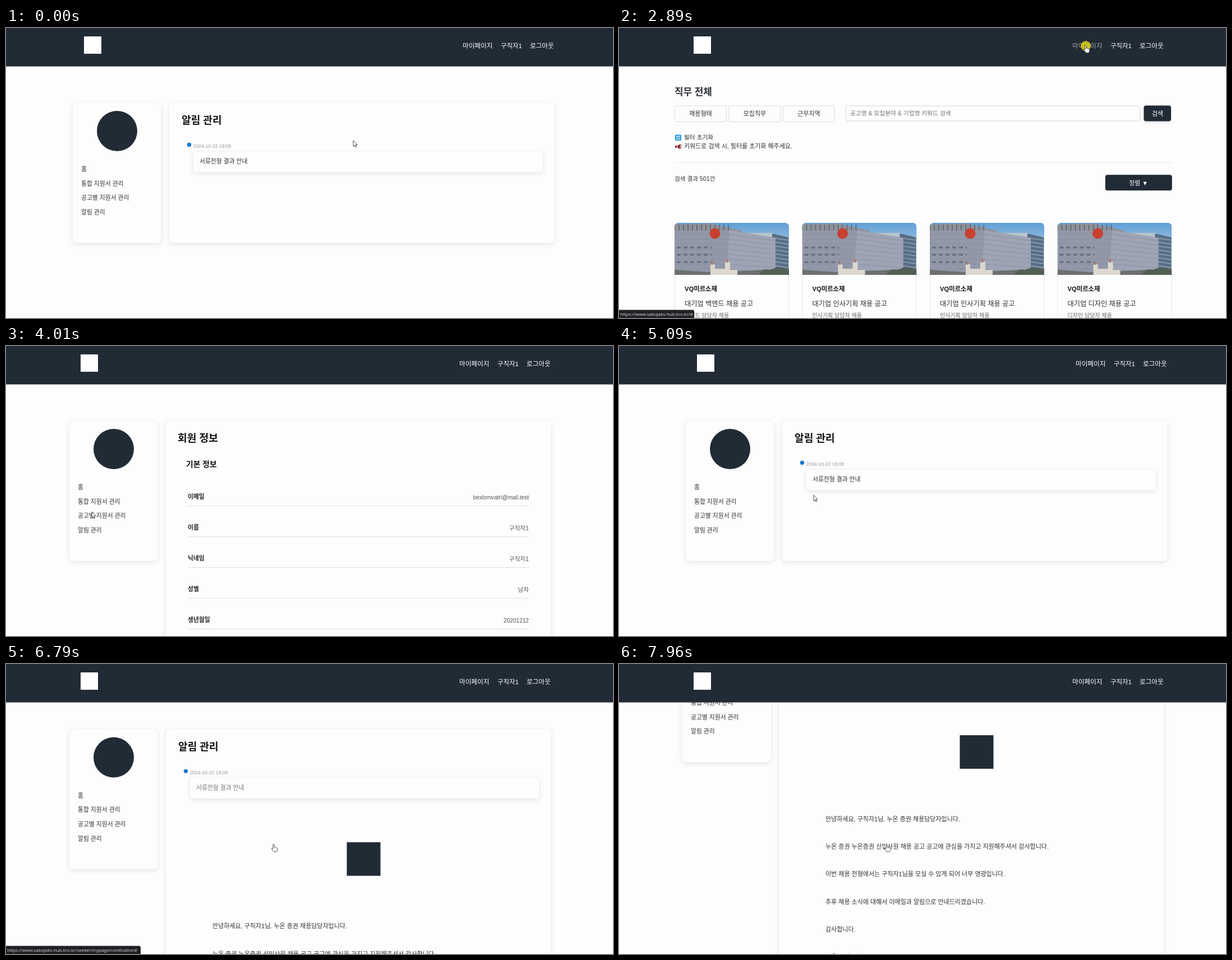
An HTML page for the animation above (8000 ms loop, 1082 by 518 pixels).

```html
<!DOCTYPE html>
<html lang="ko">
<head>
<meta charset="utf-8">
<title>알림 관리</title>
<style>
  html, body { margin: 0; width: 100%; height: 100%; overflow: hidden; background: #fdfdfd; }
  svg { display: block; width: 100%; height: 100%; }
  text { font-family: 'Liberation Sans', 'Noto Sans CJK KR', 'Noto Sans CJK', sans-serif; white-space: pre; }
  .bold { font-weight: 700; }
  .mid { text-anchor: middle; }
  .end { text-anchor: end; }
  .url { font-family: 'Open Sans', 'Noto Sans', sans-serif; }
  .panel { fill: #fdfdfd; filter: drop-shadow(0 2px 4px rgba(0, 0, 0, .11)); }
</style>
</head>
<body>
<svg id="stage" viewBox="0 0 1082 518"></svg>
<script>
const DARK = '#212b36', PAPER = '#fdfdfd', INK = '#2b2e33', LOOP = 8000;
const USER = '구직자1', FIRM = '누온 증권';
const SITE = 'https://www.sabujaks-hub.kro.kr';

const text = (x, y, size, str, fill = INK, cls = '', id = '') =>
  `<text x="${x}" y="${y + size * .37}" font-size="${size}" fill="${fill}" class="${cls}" id="${id}">${str}</text>`;
const box = (x, y, w, h, fill, r = 0, more = '') =>
  `<rect x="${x}" y="${y}" width="${w}" height="${h}" rx="${r}" fill="${fill}" ${more}/>`;
const line = (x1, x2, y, color) => `<path d="M${x1} ${y}H${x2}" stroke="${color}"/>`;
const panel = (x, y, w, h, r = 8, id = '') => box(x, y, w, h, PAPER, r, `class="panel" id="${id}"`);
const group = (id, ...parts) => `<g id="${id}">${parts.join('')}</g>`;
const repeat = (n, make) => Array.from({ length: n }, (_, i) => make(i)).join('');

const header = group('header',
  box(-20, 0, 1122, 68.6, DARK),
  box(133, 15, 31, 31, '#fff'),
  text(808, 32, 11.6, '마이페이지', '#fff', '', 'myPage'),
  text(876, 32, 11.4, USER, '#fff'),
  text(928, 32, 11.6, '로그아웃', '#fff'));

// Office building under a blue sky, 204 x 93, with the card's rounded top
const photo = `<linearGradient id="sky" x2="0" y2="1"><stop stop-color="#5f9fd6"/><stop offset=".6" stop-color="#b4cfe8"/></linearGradient>
<clipPath id="photoClip">${box(0, 0, 204, 110, '#000', 7)}</clipPath>
<clipPath id="photoFrame">${box(0, 0, 204, 93, '#000')}</clipPath>
<g id="photo" clip-path="url(#photoClip)"><g clip-path="url(#photoFrame)">
  ${box(0, 0, 204, 93, 'url(#sky)')}
  <path d="M0 3L62 1L120 14V24H0Z" fill="#8e9198"/>
  ${repeat(13, i => `<path d="M${i * 8} 3v12" stroke="#59616d" stroke-width="1.5"/>`)}
  <path d="M116 18h60v14h-60z" fill="#b9c3d0"/>
  <path d="M174 19l29 7v67h-29z" fill="#596e85"/>
  ${repeat(9, i => `<path d="M176 ${27 + i * 7}l27 4" stroke="#91a5b9" stroke-width="1.3"/>`)}
  <path d="M0 14L98 13L180 27V93H0Z" fill="#9298a8"/>
  <path d="M98 13L180 27V93H92Z" fill="#9ea4b4"/>
  ${repeat(8, i => `<path d="M0 ${20 + i * 9}H95L180 ${32 + i * 8}" stroke="#858b9c" stroke-width=".7" fill="none"/>`)}
  ${repeat(3, i => `<path d="M4 ${44 + i * 13}h62" stroke="#656c7b" stroke-width="3" stroke-dasharray="7 5"/>`)}
  <path d="M0 84l60 4l80-3l64-4v12H0z" fill="#6c706e"/>
  <path d="M64 93V74h8v8h18V70h9v14h13v9z" fill="#dcd8d0"/>
  <path d="M67 75v-6M94 71v-6" stroke="#b37a5c" stroke-width="3"/>
  <path d="M150 93q8-14 20-8q14-10 34 0v8z" fill="#525f54"/>
  <circle cx="72" cy="19" r="9.5" fill="#c8402f"/>
</g></g>`;

const jobCard = (job, i) => {
  const x = 99 + i * 227.5;
  return box(x + .5, 348.5, 203, 220, PAPER, 7, 'stroke="#e4e6e8"') +
    `<use href="#photo" x="${x}" y="348"/>` +
    text(x + 18, 466, 11.3, 'VQ미르소재', '#111', 'bold') +
    text(x + 18, 492, 12.2, `대기업 ${job} 채용 공고`) +
    text(x + 18, 513, 10, `${job} 담당자 채용`, '#666');
};

const pageButton = (x, tip) => box(x, 419, 31, 28, '#efefef', 4) +
  `<path d="M${x + 15.5 + tip} 434l${-2 * tip} -3.8v7.6z" fill="#a4abac"/>`;

const home = group('home',
  text(99, 114, 16.9, '직무 전체', INK, 'bold'),
  ['채용형태', '모집직무', '근무지역'].map((name, i) =>
    box(99.5 + i * 96.3, 139, 92, 28.5, PAPER, 3, 'stroke="#d8dbde"') +
    text(145.5 + i * 96.5, 153, 11, name, INK, 'mid')).join(''),
  box(404.5, 139, 524, 27, PAPER, 3, 'stroke="#d3d6da"'),
  text(412, 152, 10.7, '공고명 &amp; 모집분야 &amp; 기업명 키워드 검색', '#6f7378'),
  box(935.5, 138.5, 48.5, 28, DARK, 4, 'style="filter:drop-shadow(0 2px 2px #0002)"'),
  text(960, 152.5, 11, '검색', '#fff', 'mid'),
  box(100, 190.5, 11, 10.5, '#2a9fd9', 1.5),
  '<path d="M103 196v-2.5h4.5m0 -1.2v2.4M108 195.5v2.5h-4.5m0 -1.2v2.4" stroke="#fff" stroke-width="1.2" fill="none"/>',
  text(116, 195, 10.7, '필터 초기화'),
  '<path d="M100 210h3v4h-3zM104 210l5-2.5v8.5l-5-2zM110 207h1v9h-1z" fill="#8c2a30"/>',
  text(116, 211, 10.97, '키워드로 검색 시, 필터를 초기화 해주세요.'),
  line(99, 986, 240.5, '#e6e7e8'),
  box(866.8, 262.3, 119, 28, DARK, 4),
  text(926, 276.5, 11, '정렬 ▼', '#fff', 'mid'),
  group('empty',
    text(99, 269.5, 10.7, '검색 결과 건'),
    pageButton(507, -3.5), pageButton(546, 3.5),
    line(0, 1082, 476, '#e6e6e6'),
    box(526, 510, 32, 32, DARK)),
  group('results',
    text(99, 269.5, 10.6, '검색 결과 501건'),
    ['백엔드', '인사기획', '인사기획', '디자인'].map(jobCard).join('')));

const sidebar = panel(113, 134, 157.5, 250) +
  `<circle cx="192" cy="184" r="36" fill="${DARK}"/>` +
  ['홈', '통합 지원서 관리', '공고별 지원서 관리', '알림 관리']
    .map((name, i) => text(128, 252 + i * 25.6, 10.8, name)).join('');

const profileRows = [
  ['이메일', 'bexlomvatri@mail.test'], ['이름', USER], ['닉네임', USER], ['성별', '남자'], ['생년월일', '20201212']
];
const profile = group('profile',
  text(306, 164, 18.2, '회원 정보', '#111', 'bold'),
  text(321, 211, 13.8, '기본 정보', '#111', 'bold'),
  profileRows.map(([label, value], i) =>
    text(324, 269 + i * 55, 10.8, label, '#222', 'bold') +
    text(932, 270 + i * 55, /[가-힣]/.test(value) ? 10.6 : 10.1, value, '#555', 'end') +
    line(324, 932, 285.5 + i * 55, '#dedfe0')).join(''));

const mailLines = [
  `안녕하세요, ${USER}님. ${FIRM} 채용담당자입니다.`,
  `${FIRM} ${FIRM.replace(' ', '')} 신입사원 채용 공고 공고에 관심을 가지고 지원해주셔서 감사합니다.`,
  `이번 채용 전형에서는 ${USER}님을 모실 수 있게 되어 너무 영광입니다.`,
  '추후 채용 소식에 대해서 이메일과 알림으로 안내드리겠습니다.',
  '감사합니다.',
  `${FIRM} 드림`
];
const notice = group('notice',
  text(307, 164.5, 18.1, '알림 관리', '#111', 'bold'),
  '<circle cx="320.5" cy="208.5" r="3.7" fill="#1877cf"/>',
  text(327.5, 210.5, 8.6, '2024-10-22 18:08', '#999'),
  panel(328, 221, 622.5, 36.5, 4),
  text(339, 238.5, 10.8, '서류전형 결과 안내', INK, '', 'noticeTitle'),
  group('mail',
    box(607.5, 335.5, 60, 60, DARK, 0, 'id="mailMark"'),
    group('mailText', mailLines.map((s, i) => text(368, 485.5 + i * 49.1, 11, s)).join(''))));

const hand = 'M3 8V1.2a1.1 1.1 0 0 1 2.2 0V5.2c.8-.6 1.9-.2 2 .6.8-.5 1.8 0 1.9.8.9-.3 1.7.2 1.7 1.2V9.5c0 2.5-1 4-3.3 4H6C4.5 13.5 3.6 12.6 2.8 11.2L.7 8.3C0 7.2 1.2 6.3 2 7.1Z';
const pointer = group('pointer',
  '<circle id="click" cy="1" r="9" fill="#fff000" opacity=".68"/>',
  `<path id="hand" d="${hand}" transform="translate(-4)" fill="#fff" stroke="#222" stroke-width=".8"/>`,
  '<path id="arrow" d="M0 0v10.5l2.4-2.2 1.7 3.8 1.5-.7-1.7-3.7h3.4z" fill="#fff" stroke="#222" stroke-width=".8"/>');

document.getElementById('stage').innerHTML =
  `<defs>${photo}</defs>` +
  home +
  group('account', sidebar, panel(285, 134, 686.5, 250, 8, 'mainPanel'), profile, notice) +
  header +
  group('status', box(-4, 503.5, 130, 20, '#202124', 3, 'id="statusBox"'), text(2, 511.5, 8, '', '#dcdcdc', 'url', 'statusText')) +
  pointer;

const $ = id => document.getElementById(id);
const show = (id, on) => { $(id).style.display = on ? '' : 'none'; };
const move = (id, x, y) => $(id).setAttribute('transform', `translate(${x} ${y})`);
const during = (t, ...spans) => spans.some(([a, b]) => t >= a && t < b);

// Eased value of a [time, ...values] track
function along(track, t) {
  const next = track.findIndex(key => key[0] > t);
  if (next === 0) return track[0].slice(1);
  if (next < 0) return track[track.length - 1].slice(1);
  const [from, to] = [track[next - 1], track[next]];
  const p = (t - from[0]) / (to[0] - from[0]), eased = p * p * (3 - 2 * p);
  return from.slice(1).map((v, i) => v + (to[i + 1] - v) * eased);
}

const pointerTrack = [
  [840, 619, 201], [1420, 157, 31], [1850, 157, 31], [2430, 832, 31], [3030, 832, 31],
  [3810, 175, 275], [3880, 175, 275], [4010, 153, 296], [4200, 149, 328], [4810, 149, 328],
  [5230, 415, 245], [5850, 415, 245], [6230, 440, 283], [6300, 440, 283], [6370, 477, 322]
];
const scrollTrack = [[6700, 0], [7070, 113], [7470, 113], [8119, 225]];

function statusAt(t) {
  if (during(t, [1390, 1880])) return [SITE, 126];
  if (during(t, [2390, 3110])) return [SITE + '/#', 134];
  if (during(t, [6520, 7540])) return [SITE + '/seeker/mypage/notification#', 240];
  return ['', 0];
}

function draw(t) {
  const onHome = during(t, [1520, 3100]), onProfile = during(t, [3100, 4560]);
  const mailOpen = t >= 5560, markLoaded = t >= 5900;
  // Short pages have no scrollbar, so their content sits further right
  const shift = onHome || onProfile || mailOpen ? 0 : 6;

  show('home', onHome);
  show('empty', t < 1850);
  show('results', t >= 1850);
  show('account', !onHome);
  show('profile', onProfile);
  show('notice', !onProfile);
  show('mail', mailOpen);
  show('mailMark', markLoaded);
  move('mailText', 0, markLoaded ? 0 : -6);
  $('mainPanel').setAttribute('height', onProfile || mailOpen ? 900 : 250);
  move('account', shift, -along(scrollTrack, t)[0]);
  move('header', shift, 0);
  $('myPage').setAttribute('fill', during(t, [2390, 3100]) ? '#a5a9ae' : '#fff');
  $('noticeTitle').setAttribute('fill', during(t, [5180, 5560], [6520, LOOP]) ? '#777' : INK);

  const [url, width] = statusAt(t);
  show('status', width);
  $('statusBox').setAttribute('width', width + 4);
  $('statusText').textContent = url;

  const isHand = during(t, [1390, 1880], [2390, 3110], [4130, 4880], [5180, LOOP]);
  show('hand', isHand);
  show('arrow', !isHand);
  show('click', during(t, [1450, 1560], [2890, 3030], [4380, 4500], [5430, 5540]));
  move('pointer', ...along(pointerTrack, t));
}

const start = performance.now();
function tick() {
  draw((performance.now() - start) % LOOP);
  requestAnimationFrame(tick);
}
tick();
</script>
</body>
</html>
```
